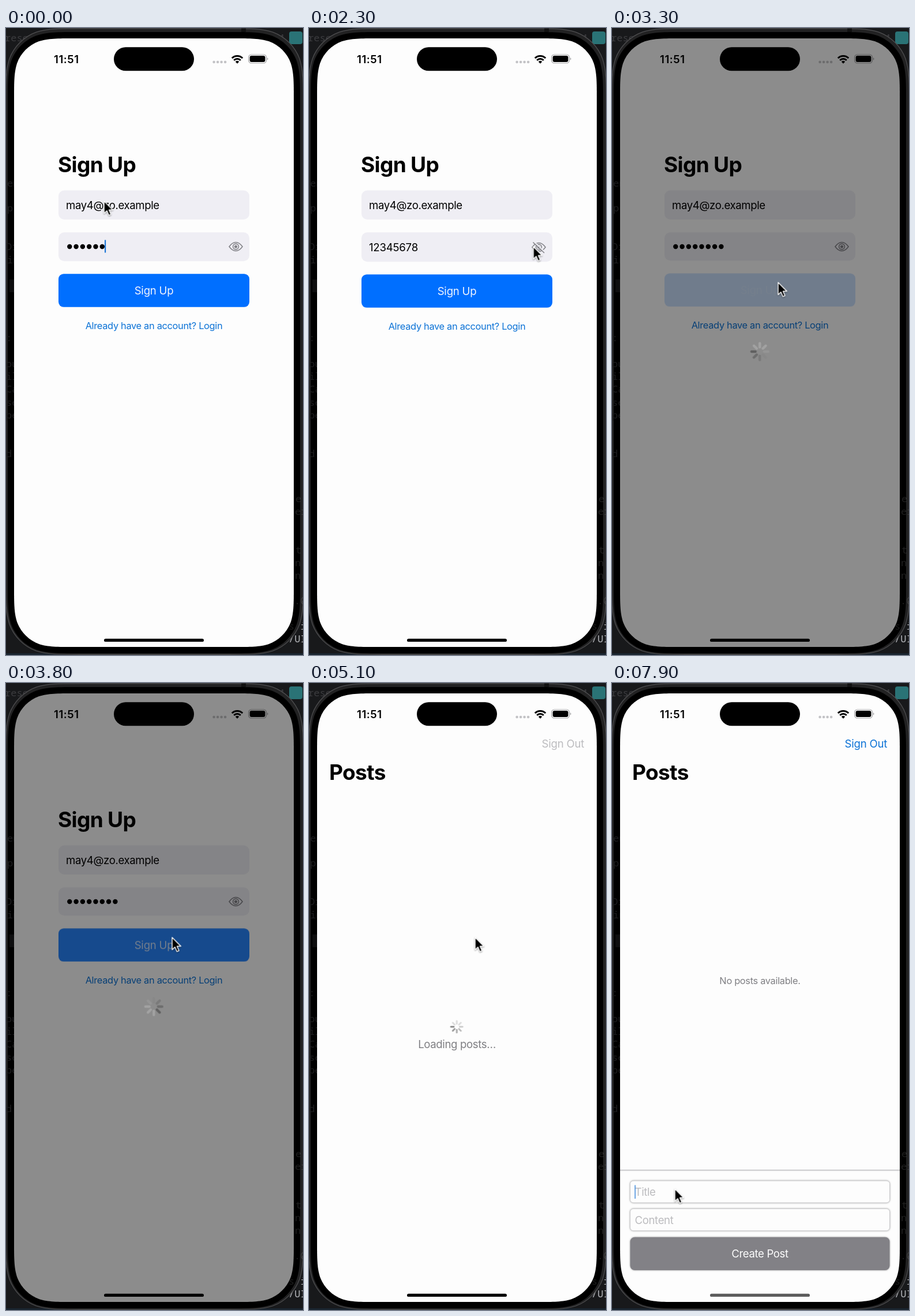
An HTML page for the animation above (8 s loop, 515 by 1087 pixels).

```html
<!DOCTYPE html>
<html lang="en">
<head>
<meta charset="utf-8">
<title>Sign up flow</title>
<style>
  html, body { margin: 0; width: 100%; height: 100%; overflow: hidden; background: #141517; }
  svg { display: block; }
  text { font: 18.6px Inter, Roboto, sans-serif; letter-spacing: -.02em; white-space: pre; }
  .title { font-size: 37px; font-weight: 700; letter-spacing: -.018em; }
  .small { font-size: 16.4px; }
  .snug { letter-spacing: -.012em; }
  .clock { font-weight: 600; letter-spacing: .03em; }
  .mid { text-anchor: middle; }
  .code text { font: 17px "Noto Sans Mono", monospace; letter-spacing: 0; }
  .link { fill: #0b72d6; }
  .hint { fill: #bcbcbf; }
  .note { fill: #7f7f83; }
  .input { fill: #fdfdfd; stroke: #cbcbcd; filter: drop-shadow(0 0 1.5px #0005); }

  /* Every timeline is one 8 s loop: 1.25% = 100 ms.
     Steps run slightly ahead so they never land on a tick late. */
  .step { animation: 8s step-end -.02s infinite; }
  .ease { animation: 8s ease-in-out infinite; }
  .fade { animation: 8s linear infinite; }

  .signup { animation-name: signup; }
  .posts { animation-name: posts; }
  .loading { animation-name: loading; }
  .loaded { animation-name: loaded; }
  .plain { animation-name: plain; }
  .secret { animation-name: secret; }
  .dot7 { animation-name: dot7; }
  .dot8 { animation-name: dot8; }
  .caret { animation-name: caret; }
  .below { animation-name: below; }
  .field { animation-name: field; }
  .press { animation-name: press; }
  .dim { animation-name: dim; }
  .busy { animation-name: busy; }
  .title-caret { animation-name: title-caret; }
  .home { animation-name: home; }
  .pointer { animation-name: pointer; }
  .code-a { animation-name: signup; }
  .code-b { animation-name: code-b; }
  .code-c { animation-name: code-c; }
  .turn { animation: turn .8s steps(8) -.02s infinite; }

  @keyframes signup { 0% { opacity: 1 } 63.75%, 100% { opacity: 0 } }
  @keyframes posts { 0% { opacity: 0 } 63.75%, 100% { opacity: 1 } }
  @keyframes loading { 0% { opacity: 0 } 63.75% { opacity: 1 } 73.75%, 100% { opacity: 0 } }
  @keyframes loaded { 0% { opacity: 0 } 73.75%, 100% { opacity: 1 } }
  @keyframes plain { 0% { opacity: 0 } 16.25% { opacity: 1 } 32.5%, 100% { opacity: 0 } }
  @keyframes secret { 0% { opacity: 1 } 16.25% { opacity: 0 } 32.5%, 100% { opacity: 1 } }
  @keyframes dot7 { 0% { opacity: 0 } 1.25%, 100% { opacity: 1 } }
  @keyframes dot8 { 0% { opacity: 0 } 3.75%, 100% { opacity: 1 } }
  @keyframes caret {
    0% { transform: none; opacity: 1 }
    1.25% { transform: translateX(11.3px); opacity: 1 }
    3.75% { transform: translateX(22.6px); opacity: 1 }
    10%, 100% { transform: translateX(22.6px); opacity: 0 }
  }
  @keyframes below {
    0% { transform: none }
    16.25% { transform: translateY(1px) }
    32.5%, 100% { transform: translateY(-.8px) }
  }
  @keyframes field { 0% { height: 50px } 16.25% { height: 51px } 32.5%, 100% { height: 49px } }
  @keyframes press { 0%, 38.75% { opacity: 1 } 40%, 42.5% { opacity: .2 } 48.75%, 100% { opacity: 1 } }
  @keyframes dim { 0%, 38.75% { opacity: 0 } 41.25%, 100% { opacity: .447 } }
  @keyframes busy { 0% { opacity: 0 } 40%, 100% { opacity: 1 } }
  @keyframes title-caret {
    0% { opacity: 0 } 92.5% { opacity: 1 } 96.25% { opacity: .4 }
    97.5% { opacity: 0 } 98.75%, 100% { opacity: .6 }
  }
  @keyframes home { 0%, 73.75% { fill: #000 } 76.25%, 100% { fill: #5c5c5c } }
  @keyframes code-b { 0% { opacity: 0 } 63.75% { opacity: 1 } 92.5%, 100% { opacity: 0 } }
  @keyframes code-c { 0% { opacity: 0 } 92.5%, 100% { opacity: 1 } }
  @keyframes turn { to { transform: rotate(360deg) } }
  @keyframes pointer {
    0%, 5% { transform: translate(170px, 300px) }
    13.75%, 32.5% { transform: translate(389px, 379px) }
    38.75%, 80% { transform: translate(288px, 441px) }
    88.75% { transform: translate(98px, 911px) }
    92.5%, 100% { transform: translate(109px, 877px) }
  }
</style>
</head>
<body>
<svg width="515" height="1087" viewBox="0 0 515 1087">
  <defs>
    <clipPath id="screen"><path data-box="14 18 485 1055 68.4"/></clipPath>
    <g id="code" class="code">
      <g class="step code-a">
        <text x="502" y="822">e</text><text x="501" y="844">er</text>
        <text x="502" y="911">t</text><text x="501" y="933">n</text>
        <text x="501" y="955">n</text><text x="500" y="999">.0</text>
        <text x="490" y="1043">s i</text><text x="490" y="1065">/UI</text>
      </g>
      <g class="step code-b">
        <text x="502" y="877">t</text><text x="500" y="899">ns</text>
        <text x="501" y="921">nt</text><text x="501" y="965">lo</text>
        <text x="506" y="1033">d</text><text x="478" y="1067">ated</text>
      </g>
      <g class="step code-c">
        <text x="500" y="820">ns</text><text x="500" y="842">in</text>
        <text x="501" y="887">o</text><text x="501" y="987">ed</text>
        <text x="506" y="1021">e</text><text x="490" y="1043">red</text><text x="501" y="1065">cu</text>
      </g>
    </g>
    <g id="eye" fill="none" stroke="#838388" stroke-width="1.6">
      <path d="M387 379C391 373.5 395 371.5 398.5 371.5S406 373.5 410 379C406 384.5 402 386.5 398.5 386.5S391 384.5 387 379Z"/>
      <circle cx="398.5" cy="379" r="4.9"/>
      <circle cx="398.5" cy="379" r="2.6" fill="#838388" stroke="none"/>
    </g>
  </defs>

  <!-- Desktop behind the phone -->
  <rect width="515" height="1087" fill="#18191b"/>
  <rect y="1084" width="515" height="3" fill="#1a2530"/>
  <rect x="491" y="6" width="23" height="22" rx="4" fill="#2a7376"/>
  <g class="code" fill="#3c3c3f"><text x="-2" y="23">rese</text><text x="473" y="23">4</text></g>
  <use href="#code" fill="#a9abaf"/>

  <!-- Phone body -->
  <path data-box="-.5 .8 516 1085.5 84" fill="#222223" stroke="#505052" stroke-width="1.2"/>
  <rect x="408" y="1" width="8" height="6" fill="#111"/>
  <path data-box="3 7 507 1077 79.5"/>
  <g class="code" fill="#1d1d1f">
    <text x="2" y="275">en</text><text x="2" y="318">p.</text>
    <text x="0" y="385">Di</text><text x="2" y="408">in</text>
    <rect x="6" y="436" width="8" height="22" fill="#0e0e0f"/>
    <text x="0" y="543">:</text><text x="0" y="588">ou</text>
    <text x="0" y="610">ill</text><text x="0" y="632">Ca</text>
    <text x="0" y="655">se</text><text x="0" y="677">pe</text><text x="0" y="744">d.</text>
  </g>
  <use href="#code" fill="#fff" opacity=".12"/>

  <g clip-path="url(#screen)">
    <rect x="14" y="18" width="485" height="1055" fill="#fdfdfd"/>

    <!-- Status bar -->
    <text class="clock" x="83" y="61">11:51</text>
    <path d="M360.6 59h21" stroke="#c3c3c6" stroke-width="4.6" stroke-linecap="round" stroke-dasharray="0 6.5"/>
    <g fill="none" stroke="#000" stroke-width="3">
      <path d="M391.8 52.2a13 13 0 0 1 18.4 0M395.2 56a8.2 8.2 0 0 1 11.6 0"/>
      <path d="M397.8 58.4a4.6 4.6 0 0 1 6.4 0l-3.2 3.4z" fill="#000" stroke="none"/>
    </g>
    <rect x="420.6" y="46" width="30.8" height="15" rx="4.8" fill="none" stroke="#a3a3a5" stroke-width="1.2"/>
    <rect x="422.6" y="48" width="26.8" height="11" rx="3.2"/>
    <path d="M452.8 51.2q1.6 .6 1.6 2.3t-1.6 2.3z" fill="#a3a3a5"/>

    <!-- Sign up form -->
    <g class="step signup">
      <text class="title" x="90" y="249.6">Sign Up</text>
      <rect x="91" y="281.5" width="331" height="50.5" rx="10" fill="#efeef4"/>
      <text x="104" y="313.5">may4@zo.example</text>

      <rect class="step field" x="91" y="354.3" width="331" height="50" rx="10" fill="#efeef4"/>
      <g class="step secret">
        <path d="M110.3 379h57" stroke="#000" stroke-width="8.4" stroke-linecap="round" stroke-dasharray="0 11.3"/>
        <circle class="step dot7" cx="178.1" cy="379" r="4.2"/>
        <circle class="step dot8" cx="189.4" cy="379" r="4.2"/>
        <rect class="step caret" x="171" y="367.5" width="2.2" height="22" fill="#1f78d8"/>
        <use href="#eye"/>
      </g>
      <g class="step plain">
        <text class="snug" x="104" y="386.5">12345678</text>
        <g transform="translate(0 1)">
          <use href="#eye"/>
          <path d="M390.5 369.8l18 17.5" stroke="#efeef4" stroke-width="2"/>
          <path d="M389 371l18.5 17.5" stroke="#838388" stroke-width="1.7" stroke-linecap="round"/>
        </g>
      </g>

      <g class="step below">
        <g class="fade press">
          <rect x="91" y="426.2" width="331" height="57.6" rx="9" fill="#006fff"/>
          <text class="mid snug fade press" x="256.5" y="462" fill="#f2f6fd">Sign Up</text>
        </g>
        <text class="mid small link" x="256.5" y="522">Already have an account? Login</text>
      </g>
    </g>

    <!-- Posts -->
    <g class="step posts">
      <text class="title" x="35" y="168.2">Posts</text>
      <g class="step loading">
        <text class="snug hint" x="403.5" y="111.5">Sign Out</text>
        <g class="spin" transform="translate(256.3 596) rotate(135)" data-spoke="5.2,10 2.9 138 220"></g>
        <text class="mid note" x="256.5" y="632.5">Loading posts…</text>
      </g>
      <g class="step loaded">
        <text class="snug link" x="403.5" y="111.5">Sign Out</text>
        <text class="mid small note" x="256.5" y="522">No posts available.</text>
        <rect x="14" y="843" width="485" height="3" fill="#e6e6e7"/>
        <rect x="14" y="844.3" width="485" height="1.2" fill="#c6c6c8"/>
        <rect class="input" x="31.5" y="863" width="450" height="38" rx="5.5"/>
        <text class="hint" x="39.5" y="889">Title</text>
        <rect class="input" x="31.5" y="911.5" width="450" height="38" rx="5.5"/>
        <text class="hint" x="39.5" y="937.5">Content</text>
        <rect x="31.5" y="960.7" width="450" height="57.3" rx="8" fill="#828186" style="filter: drop-shadow(0 0 1.5px #0006)"/>
        <text class="mid" x="256.5" y="996" fill="#fdfdfd">Create Post</text>
        <rect class="step title-caret" x="39" y="870.5" width="2.2" height="23.5" fill="#1f78d8"/>
      </g>
    </g>

    <rect class="fade home" x="170" y="1058.7" width="173" height="5.4" rx="2.7"/>

    <!-- Waiting overlay -->
    <g class="step signup">
      <rect class="fade dim" x="14" y="18" width="485" height="1055"/>
      <g class="step busy">
        <g class="spin" transform="translate(256.3 561) rotate(225)" data-spoke="7.6,14.4 4.4 96 162"></g>
      </g>
    </g>
    <rect x="187" y="33.3" width="139" height="41" rx="20.5"/>
  </g>

  <g class="ease pointer">
    <path transform="scale(1.15)" d="M0 0V18.6L4.3 14.6L7.2 21.4L10.4 20L7.5 13.4H13.3Z"
      stroke="#fff" stroke-width="1.3" stroke-linejoin="round" style="filter: drop-shadow(0 1px 1px #0006)"/>
  </g>
</svg>
<script>
  const make = (tag, attrs, parent) => {
    const el = document.createElementNS("http://www.w3.org/2000/svg", tag);
    for (const key in attrs) el.setAttribute(key, attrs[key]);
    return parent.appendChild(el);
  };

  // Box with smooth, continuous-curvature corners
  const smoothBox = (x, y, w, h, r) => {
    const edge = 1.5287, pull = 1.0885, ease = .8684, far = .6315, near = .0749, c = .3728, d = .1691;
    const corner = (cx, cy, ux, uy, vx, vy) => {
      const p = (u, v) => `${cx + r * (u * ux + v * vx)} ${cy + r * (u * uy + v * vy)} `;
      return p(edge, 0) +
        "C" + p(pull, 0) + p(ease, 0) + p(far, near) +
        "C" + p(c, d) + p(d, c) + p(near, far) +
        "C" + p(0, ease) + p(0, pull) + p(0, edge);
    };
    return "M" + corner(x, y, 0, 1, 1, 0) +
      "L" + corner(x + w, y, -1, 0, 0, 1) +
      "L" + corner(x + w, y + h, 0, -1, -1, 0) +
      "L" + corner(x, y + h, 1, 0, 0, -1) + "Z";
  };
  for (const path of document.querySelectorAll("[data-box]"))
    path.setAttribute("d", smoothBox(...path.dataset.box.split(" ").map(Number)));

  // Eight spokes, darkest at the head and lighter along the tail
  for (const spin of document.querySelectorAll(".spin")) {
    const [span, width, dark, light] = spin.dataset.spoke.split(" ");
    const [inner, outer] = span.split(",");
    const wheel = make("g", { class: "turn" }, spin);
    for (let i = 0; i < 8; i++) {
      const shade = Math.round(+dark + (light - dark) * Math.min(1, i / 5));
      make("path", {
        d: `M0 -${inner}V-${outer}`,
        transform: `rotate(${-45 * i})`,
        stroke: `rgb(${shade},${shade},${shade})`,
        "stroke-width": width,
        "stroke-linecap": "round"
      }, wheel);
    }
  }
</script>
</body>
</html>
```
